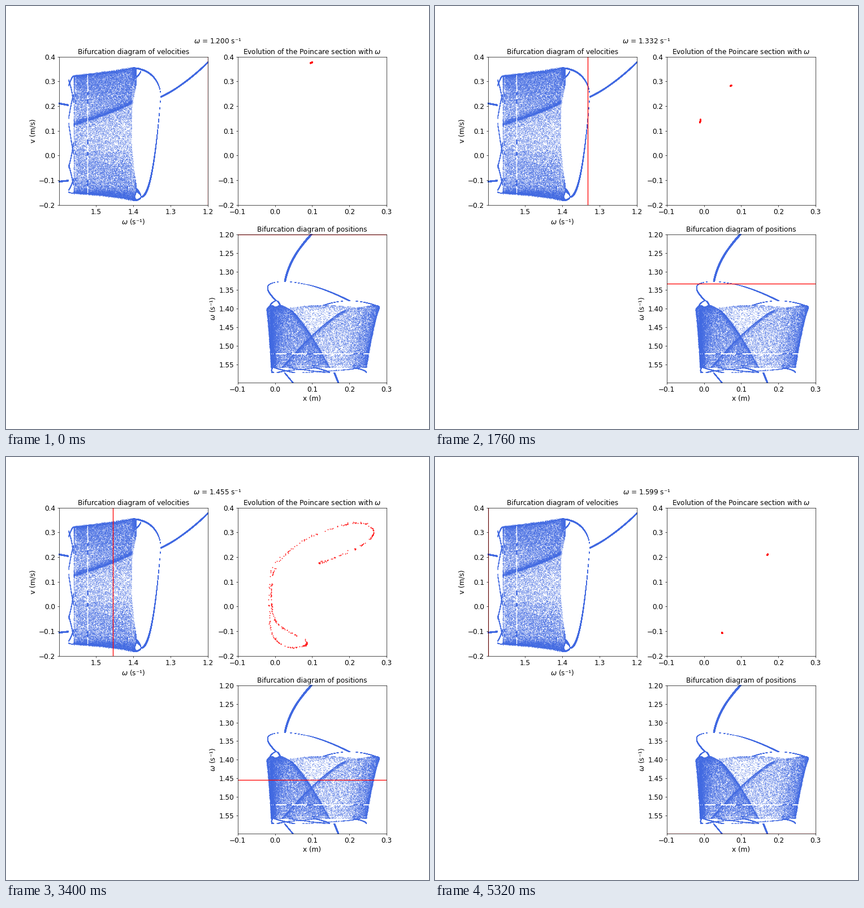
A matplotlib script for the animation above (5340 ms loop, 748 by 748 pixels).

```python
import numpy as np
import matplotlib.pyplot as plt
from matplotlib.animation import FuncAnimation

SIZE, INCHES = 748, 12
FRAMES, STEP, N = 267, 0.0015, 300
OMEGAS = 1.2 + STEP * np.arange(FRAMES)
BLUE = np.array([65, 105, 225]) / 255

# Bifurcations: period 1 -> 2 -> 4 -> bands -> chaos -> window -> period 2
DOUBLE, QUAD, BANDS, CHAOS, WINDOW, PAIR = (1.3265, 1.379, 1.3912, 1.404,
                                            1.5595, 1.5735)

plt.rcParams.update({"font.family": "DejaVu Sans", "font.size": 14,
                     "axes.titlesize": 14})

# Knots of the attractor: x, v where chaos starts, then x, v where it ends
KNOTS = np.array([
    (.03, .26, 0, .14), (-.014, .17, -.008, .1), (-.022, 0, -.008, -.01),
    (-.01, -.135, -.003, -.09), (.015, -.182, .05, -.14),
    (.036, -.165, .125, -.152), (.03, -.135, .14, -.137),
    (0, -.085, .02, -.055), (-.011, 0, -.007, .02), (0, .165, .003, .15),
    (.075, .27, .09, .275), (.225, .355, .205, .322),
    (.28, .318, .245, .285), (.25, .26, .2, .222), (.2, .22, .025, .125),
    (.23, .25, .055, .165)])
U_MAX = 14.5


def curve(u, w):
    """Catmull-Rom curve through the knots, which drift with w."""
    s = np.clip((w - 1.4) / .16, 0, 1) ** .75
    p = (1 - s) * KNOTS[:, :2] + s * KNOTS[:, 2:]
    p = np.vstack([2 * p[0] - p[1], p, 2 * p[-1] - p[-2]])
    u = np.clip(u, 0, U_MAX)
    i = u.astype(int)
    t = (u - i)[:, None]
    a, b, c, d = p[i], p[i + 1], p[i + 2], p[i + 3]
    return b + t / 2 * (c - a + t * (2 * a - 5 * b + 4 * c - d
                                     + t * (3 * (b - c) + d - a)))


def orbit(w):
    """Points (x, v) of the periodic orbit at w."""
    if w < DOUBLE:
        d = DOUBLE - w
        return [(.027 + .185 * d + 2.94 * d**2,
                 .237 + .719 * d + 3.08 * d**2)]
    if w < QUAD:
        q = np.sqrt((w - DOUBLE) / (QUAD - DOUBLE))
        return [(.027 + .173 * q**1.2, .348 - .111 * (1 - q)**1.4),
                (.027 - .16 * q + .137 * q**2,
                 .237 - .405 * np.sin(np.pi / 2 * q)**2)]
    if w < BANDS:
        e = np.sqrt((w - QUAD) / (BANDS - QUAD))
        return [(.2 + .07 * e, .348 + .005 * e), (.2 - .07 * e, .348 - .03 * e),
                (.004 - .017 * e, -.168 + .028 * e),
                (.004 + .01 * e, -.168 - .014 * e)]
    d = OMEGAS[-1] - w
    return [(.17 - .4 * d, .211 - .28 * d), (.048 - .84 * d, -.106 + .16 * d)]


def periodic(w, rng):
    p = np.resize(orbit(w), (N, 2))
    # sampling falls slightly before or after the exact phase
    tau = rng.uniform(-.0065, .0065, N)
    push = .3 + 70 * np.maximum(0, -p[:, 0])
    return p + np.column_stack([p[:, 1] * tau, push * tau])


def clusters(w, rng, centers, width):
    return curve(np.resize(centers, N) + rng.uniform(-width, width, N), w)


def chaos(w, rng):
    p = curve(U_MAX * rng.random(N) ** .75, w)
    return p + rng.normal(0, 1, p.shape) * (.0008, .002)


def section(k):
    w, rng = OMEGAS[k], np.random.default_rng(k)
    in_gap = abs(w - 1.522) < .0015 or abs(w - 1.554) < .0005
    if BANDS <= w < CHAOS:
        grow = (w - BANDS) / (CHAOS - BANDS)
        p = clusters(w, rng, (3, 4, 10.35, 11.6), .15 + 1.1 * grow)
    elif in_gap or WINDOW <= w < PAIR:
        drift = max(0, w - WINDOW) / (PAIR - WINDOW)
        p = clusters(w, rng, np.arange(1.5, 14, 1.6) + drift, .07)
    elif CHAOS <= w < WINDOW:
        p = chaos(w, rng)
    else:
        p = periodic(w, rng)
    return p


def splat(log_clear, ax, x, y):
    """Accumulate one-pixel antialiased dots inside the axes."""
    (xa, xb), (ya, yb) = ax.get_xlim(), ax.get_ylim()
    box = ax.get_position()
    fx, fy = (x - xa) / (xb - xa), (y - ya) / (yb - ya)
    ok = (fx >= 0) & (fx <= 1) & (fy >= 0) & (fy <= 1)
    px = (box.x0 + box.width * fx[ok]) * SIZE - .5
    py = (1 - box.y0 - box.height * fy[ok]) * SIZE - .5
    i, j = np.floor(px).astype(int), np.floor(py).astype(int)
    a, b = px - i, py - j
    for di, wa in ((0, 1 - a), (1, a)):
        for dj, wb in ((0, 1 - b), (1, b)):
            np.add.at(log_clear, (j + dj, i + di), np.log(1 - .75 * wa * wb))


fig = plt.figure(figsize=(INCHES, INCHES), dpi=(SIZE + 1e-6) / INCHES,
                 facecolor="white")


def panel(pos, title, xlim, ylim, xlabel="", ylabel=""):
    ax = fig.add_subplot(2, 2, pos, facecolor="none")
    ax.set(title=title, xlim=xlim, ylim=ylim, xlabel=xlabel, ylabel=ylabel)
    return ax


first, last = OMEGAS[0], OMEGAS[-1]
w_label = r"$\omega$ (s⁻¹)"
x_lim, v_lim = (-.1, .3), (-.2, .4)
ax_v = panel(1, "Bifurcation diagram of velocities", (last, first), v_lim,
             w_label, "v (m/s)")
ax_p = panel(2, r"Evolution of the Poincare section with $\omega$",
             x_lim, v_lim)
ax_x = panel(4, "Bifurcation diagram of positions", x_lim, (last, first),
             "x (m)", w_label)

sections = [section(k) for k in range(FRAMES)]
cloud = np.vstack(sections)
cloud_w = np.repeat(OMEGAS, N)
log_clear = np.zeros((SIZE, SIZE))
splat(log_clear, ax_v, cloud_w, cloud[:, 1])
splat(log_clear, ax_x, cloud[:, 0], cloud_w)
clear = np.exp(log_clear)[..., None]
fig.figimage(clear + (1 - clear) * BLUE, 0, 0, origin="upper", zorder=-1)

v_line = ax_v.axvline(first, color="red", lw=1.5)
x_line = ax_x.axhline(first, color="red", lw=1.5)
dots = ax_p.scatter([], [], s=4, c="red", linewidths=0)
heading = fig.text(.5, (SIZE - 66) / SIZE, "", ha="center", va="baseline")


def update(k):
    w = OMEGAS[k]
    v_line.set_xdata([w, w])
    x_line.set_ydata([w, w])
    dots.set_offsets(sections[k])
    heading.set_text(rf"$\omega$ = {w + 1e-9:.3f} s⁻¹")
    return v_line, x_line, dots, heading


ani = FuncAnimation(fig, update, frames=FRAMES, interval=20,
                    init_func=lambda: update(0), repeat=True, repeat_delay=0)
plt.show()
```
